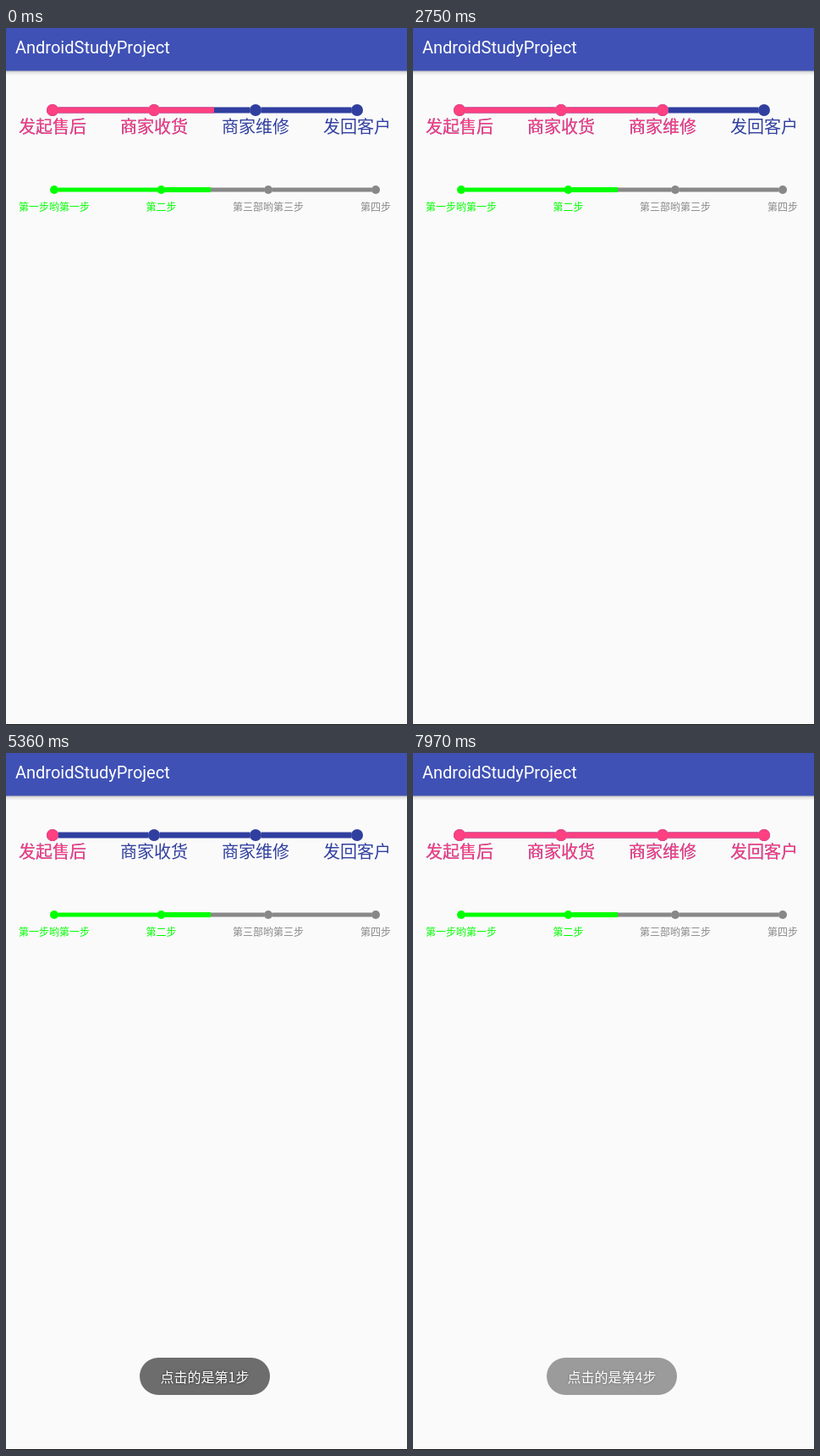
An HTML page for the animation above (8 s loop, 474 by 823 pixels).

```html
<!DOCTYPE html>
<html lang="zh-CN">
<head>
<meta charset="utf-8">
<title>Step bars</title>
<style>
  html, body { margin: 0; width: 100%; height: 100%; overflow: hidden; background: #fafafa; }
  svg { position: absolute; left: 0; top: 0; width: 474px; height: 823px; }
  text { font-family: "Noto Sans CJK SC", "Noto Sans CJK", sans-serif; text-anchor: middle; fill: currentColor; }
  .big { font-size: 20px; }
  .small { font-size: 12px; }
  .title { font: 20px Roboto, sans-serif; text-anchor: start; fill: #fff; }
  .blue { color: #303f9f; }
  .pink { color: #ff4081; }
  .green { color: #0f0; }
  .gray { color: #888; }
  #lines, #nodes, #marks, #steps { fill: currentColor; }

  /* The pink copy is cut off at the current progress. */
  .done-lines { animation: lines 8s step-end infinite; }
  .done-nodes { animation: nodes 8s step-end infinite; }
  @keyframes lines {
    0% { clip-path: inset(0 228px 0 0); }
    6.25% { clip-path: inset(0 174px 0 0); }
    43% { clip-path: inset(0 416px 0 0); }
    74.125%, 100% { clip-path: inset(0); }
  }
  @keyframes nodes {
    0% { clip-path: inset(0 228px 0 0); }
    6.25% { clip-path: inset(0 119px 0 0); }
    43% { clip-path: inset(0 359px 0 0); }
    74.125%, 100% { clip-path: inset(0); }
  }

  .toast {
    --in: cubic-bezier(.333, .667, .667, 1);
    --out: cubic-bezier(.333, .1225, .667, .4557);
    position: absolute; left: 158px; top: 714px; width: 154px; height: 44px;
    border-radius: 22px; background: #656565; color: #fff; opacity: 0;
    font: 16px/45px "Noto Sans CJK SC", "Noto Sans CJK", sans-serif;
    text-align: center; white-space: nowrap; text-shadow: 0 0 3px rgba(0, 0, 0, .73);
    animation: 8s linear infinite;
  }
  .third { animation-name: third; }
  .first { animation-name: first; }
  .fourth { animation-name: fourth; }
  @keyframes third {
    0%, 7.1875% { opacity: 0; animation-timing-function: var(--in); }
    12.1875%, 30.249% { opacity: 1; }
    30.25% { opacity: .95; animation-timing-function: var(--out); }
    34.125%, 100% { opacity: 0; }
  }
  @keyframes first {
    0%, 43.625% { opacity: 0; animation-timing-function: var(--in); }
    48.625%, 66.999% { opacity: 1; }
    67% { opacity: .95; animation-timing-function: var(--out); }
    70.875%, 100% { opacity: 0; }
  }
  @keyframes fourth {
    0%, 74.75% { opacity: 0; animation-timing-function: var(--in); }
    79.75%, 97.749% { opacity: 1; }
    97.75% { opacity: .95; animation-timing-function: cubic-bezier(.333, .167, .667, .5); }
    100% { opacity: .544; }
  }
</style>
</head>
<body>
<svg viewBox="0 0 474 823">
  <defs>
    <linearGradient id="shade" x2="0" y2="1">
      <stop stop-color="#000" stop-opacity=".3"/>
      <stop offset=".4" stop-color="#000" stop-opacity=".1"/>
      <stop offset="1" stop-color="#000" stop-opacity="0"/>
    </linearGradient>
    <g id="lines">
      <path d="M61.5 93.5h107v7h-107zM181.5 93.5h107v7h-107zM301.5 93.5h107v7h-107z"/>
    </g>
    <g id="nodes">
      <circle cx="55" cy="97" r="7"/><circle cx="175" cy="97" r="7"/>
      <circle cx="295" cy="97" r="7"/><circle cx="415" cy="97" r="7"/>
      <g class="big">
        <text x="55" y="124">发起售后</text><text x="175" y="124">商家收货</text>
        <text x="295" y="124">商家维修</text><text x="415" y="124">发回客户</text>
      </g>
    </g>
  </defs>

  <rect y="50" width="474" height="6" fill="url(#shade)"/>
  <rect width="474" height="50.5" fill="#3f51b5"/>
  <text class="title" x="11" y="30">AndroidStudyProject</text>

  <g class="blue"><use href="#lines"/><use href="#nodes"/></g>

  <g class="gray" fill="currentColor">
    <path d="M242 188.5h63.5v5h-63.5zM314.5 188.5h118v5h-118z"/>
    <circle cx="310" cy="191" r="5"/><circle cx="437" cy="191" r="5"/>
    <g class="small">
      <text x="310" y="216">第三部哟第三步</text><text x="437" y="216">第四步</text>
    </g>
  </g>
  <g class="green" fill="currentColor">
    <path d="M61.5 188.5h117.5v5h-117.5zM188 188h54v6h-54z"/>
    <circle cx="57" cy="191" r="5"/><circle cx="183.5" cy="191" r="5"/>
    <g class="small">
      <text x="57" y="216">第一步哟第一步</text><text x="183.5" y="216">第二步</text>
    </g>
  </g>
  <rect y="822" width="474" height="1" fill="#111"/>
</svg>
<svg class="pink done-lines" viewBox="0 0 474 823"><use href="#lines"/></svg>
<svg class="pink done-nodes" viewBox="0 0 474 823"><use href="#nodes"/></svg>
<div class="toast third">点击的是第3步</div>
<div class="toast first">点击的是第1步</div>
<div class="toast fourth">点击的是第4步</div>
</body>
</html>
```
